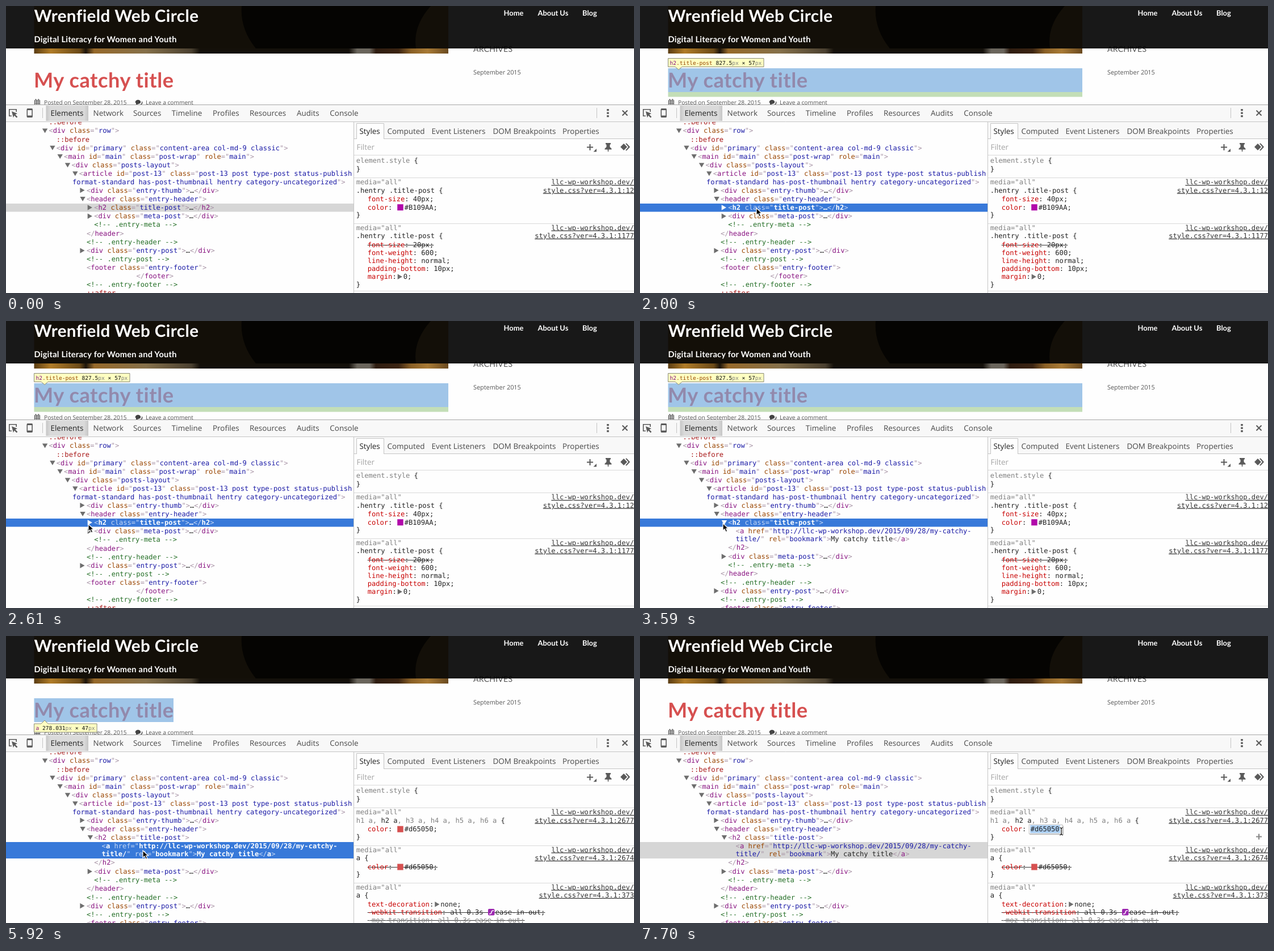
These frames come from a looping animation (1106x507 px, 8000 ms). An HTML page:

```html
<!DOCTYPE html>
<html lang="en">
<head>
<meta charset="utf-8">
<title>Inspecting a title</title>
<style>
html, body { margin: 0; width: 100%; height: 100%; overflow: hidden; background: #fefefe; }
svg { display: block; width: 100%; height: 100%; }
text { white-space: pre; text-rendering: geometricPrecision; }
.site { font-family: Lato, sans-serif; font-weight: 700; fill: #fff; }
.body { font-family: "Open Sans", sans-serif; fill: #555; }
.ui { font: 13.45px "Open Sans", sans-serif; fill: #484848; }
.code { font: 12.1px "DejaVu Sans Mono", monospace; fill: #222; }
.tip { font: 9.61px "DejaVu Sans Mono", monospace; fill: #111; }
.p { fill: #a894a6; }
.t { fill: #881280; }
.n { fill: #994500; }
.v { fill: #1a1aa6; }
.c { fill: #236e25; }
.s { fill: #a81818; }
.k { fill: #c80000; }
.dim, .dim .k { fill: #808080; }
.link { text-anchor: end; text-decoration: underline; fill: #333; }
.tri { fill: #6e6e6e; }
.sel .code, .sel .t, .sel .v { fill: #fff; font-weight: 700; }
.sel .p, .sel .n { fill: #c6d8f5; font-weight: 400; }
.sel .tri { fill: #fff; }
.blue { fill: #3879d9; }
.gray { fill: #d6d6d6; }
.hover { fill: #eaf2fb; }
.content { fill: rgba(111, 168, 220, .66); }
.padding { fill: rgba(147, 196, 125, .55); }
.bar { fill: #f8f8f8; }
.rule { stroke: #d9d9d9; }
.edge { stroke: #c4c4c4; }
.icon { fill: #5a5a5a; }
.line { fill: none; stroke: #5a5a5a; stroke-width: 1.6; }
</style>
</head>
<body>
<svg viewBox="0 0 1106 507">
  <defs>
    <linearGradient id="tab">
      <stop offset="0" stop-color="#c6c6c6"/><stop offset=".1" stop-color="#dadada"/>
      <stop offset=".9" stop-color="#dadada"/><stop offset="1" stop-color="#c6c6c6"/>
    </linearGradient>
    <linearGradient id="photo">
      <stop offset="0" stop-color="#5a3c12"/><stop offset=".04" stop-color="#b07c28"/>
      <stop offset=".11" stop-color="#6b4a18"/><stop offset=".125" stop-color="#1c140a"/>
      <stop offset=".145" stop-color="#96692a"/><stop offset=".27" stop-color="#85704a"/>
      <stop offset=".38" stop-color="#4a4030"/><stop offset=".4" stop-color="#14100a"/>
      <stop offset=".76" stop-color="#14100a"/><stop offset=".78" stop-color="#6a655c"/>
      <stop offset=".81" stop-color="#6a655c"/><stop offset=".825" stop-color="#2e1c10"/>
      <stop offset=".88" stop-color="#3b2412"/><stop offset=".91" stop-color="#8a6026"/>
      <stop offset=".95" stop-color="#a87a35"/><stop offset="1" stop-color="#6a4a20"/>
    </linearGradient>
  </defs>

  <!-- web page -->
  <rect width="1106" height="507" fill="#fefefe"/>
  <path fill="url(#photo)" d="M49.500 75H779V84H49.500z"/>
  <text class="site" x="823" y="81.3" font-size="14" letter-spacing=".25" style="font-weight:400;fill:#555">ARCHIVES</text>
  <path fill="#000" fill-opacity=".905" d="M0 0H1106V75H0z"/>
  <path fill="#130f08" d="M49.500 0H779V75H49.500z"/>
  <path fill="#050402" d="M415 0H748Q716 36 722 75H440Q412 40 415 0z"/>
  <g class="site">
    <text x="49.5" y="28" font-size="29.6" letter-spacing=".4">Wrenfield Web Circle</text>
    <text x="49.5" y="64.3" font-size="14.6" letter-spacing=".23">Digital Literacy for Women and Youth</text>
    <g font-size="12.9">
      <text x="876.5" y="17">Home</text><text x="936.5" y="17">About Us</text><text x="1015" y="17">Blog</text>
    </g>
    <text x="49" y="143.5" font-size="36.2" letter-spacing=".55" style="fill:#d65050">My catchy title</text>
  </g>
  <g class="body">
    <text x="823" y="121" font-size="10.9">September 2015</text>
    <text x="67" y="174.3" font-size="10.2">Posted on September 28, 2015</text>
    <text x="246" y="174.3" font-size="10.2">Leave a comment</text>
  </g>
  <path fill="none" stroke="#444" d="M50.5 166.5h9v9h-9zM50.5 169.5h9M53.5 167v8M56.5 167v8M50 172.500h10M52.500 164v3M57.500 164v3"/>
  <g fill="#444"><ellipse cx="232.500" cy="169.500" rx="4.800" ry="3.700"/><path d="M229 171v4l4-2zM236 174q4-1 3-6q3 3 0 6v2z"/></g>
  <g id="overlays"></g>

  <!-- element tree -->
  <path fill="#fefefe" d="M0 204H612V507H0z"/>
  <g id="tree"></g>

  <!-- styles pane -->
  <path fill="#fefefe" d="M612 204H1106V507H612z"/>
  <path class="bar" d="M613 205H1106V234H613z"/>
  <path class="edge" fill="none" d="M612.500 204V507M613 234.500H1106"/>
  <path class="edge" fill="#fefefe" d="M617.500 235V207.500H665.500V235"/>
  <path class="rule" d="M613 263.500H1106M613 303.500H1106"/>
  <g class="ui">
    <text x="622.500" y="225.800" style="fill:#222">Styles</text>
    <text x="671.500" y="225.800">Computed</text>
    <text x="749.500" y="225.800">Event Listeners</text>
    <text x="857.500" y="225.800">DOM Breakpoints</text>
    <text x="980" y="225.800">Properties</text>
    <text x="617.500" y="254" style="fill:#a4a4a4">Filter</text>
  </g>
  <path class="line" style="stroke-width:2" d="M1023 249.500h11M1028.500 244v11"/>
  <path class="icon" d="M1040 252v5.500h-5.500zM1056 242h9v2l-1.500 1v4l3 3v1.500h-5l-.5 4h-1l-.5-4h-5v-1.500l3-3v-4l-1.500-1z"/>
  <path class="icon" d="M1082 249l6-6 6 6-6 6z"/>
  <path class="icon" d="M1091 243l2-.5 6 6.500-6 6.500-2-.5 5-6z"/>
  <g id="styles"></g>

  <!-- toolbar -->
  <path class="bar" d="M0 174H1106V204H0z"/>
  <path class="edge" d="M0 204.500H1106M64.500 180V198M1040.500 180V198"/>
  <path stroke="#a6a6a6" d="M0 174.500H1106"/>
  <path fill="url(#tab)" d="M70.500 176H145V203H70.500z"/>
  <g id="tabs" class="ui"></g>
  <path class="line" d="M10 194.200H5.800V182.800H18.200V187"/>
  <path class="icon" d="M10 186l10 4-3.600 1.800 4 4-1.800 1.800-4-4-1.700 3.600z"/>
  <rect class="line" x="37.300" y="181.800" width="8.800" height="14.500" rx="1.200"/>
  <path class="icon" d="M37 181.500h9.500v2.500H37zM37 193.500h9.500v3H37zM1058.200 182h3.600v3.300h-3.600zM1058.200 187.500h3.600v3.300h-3.600zM1058.200 193h3.600v3.300h-3.600z"/>
  <path class="line" style="stroke-width:2" d="M1085.500 184.500l9 9M1094.500 184.500l-9 9"/>

  <g id="pointer"><g id="arrow">
    <path fill="#000" stroke="#fff" stroke-width="1.200" d="M0 0V12.600L3 9.900L5.200 15L7.800 13.900L5.600 9H9.600z"/>
  </g></g>
  <g id="beam">
    <path fill="none" stroke="#fff" stroke-width="2.600" d="M739 338.500q3 0 3 2.500v8q0 2.500-3 2.500M745 338.500q-3 0-3 2.500v8q0 2.500 3 2.500"/>
    <path fill="none" stroke="#111" stroke-width="1.200" d="M739 338.500q3 0 3 2.500v8q0 2.500-3 2.500M745 338.500q-3 0-3 2.500v8q0 2.500 3 2.500"/>
  </g>
</svg>

<script>
const CHAR = 7.285, TIP_CHAR = 5.785, LOOP = 8000;
const $ = id => document.getElementById(id);
const group = (id, ...parts) => `<g id="${id}">${parts.join('')}</g>`;
const box = (cls, x, y, w, h, r = 0) =>
  `<rect class="${cls}" x="${x}" y="${y}" width="${w}" height="${h}" rx="${r}"/>`;
const span = (cls, s) => s ? `<tspan class="${cls}">${s.replace(/</g, '&lt;')}</tspan>` : '';
const code = (x, mid, body, cls = '') =>
  `<text class="code ${cls}" x="${x}" y="${mid + 3.9}">${body}</text>`;
const tri = (x, mid, open) =>
  `<path class="tri" d="M${x} ${open ? mid - 4 + 'h9.4l-4.7 8z' : mid - 4.7 + 'l8.2 4.7l-8.2 4.7z'}"/>`;

// Syntax colours for one line of markup; a line may begin inside a value.
const TOKEN = /^([^<"=]+)(")|(<!--.*?-->)|(::\w+)|(<\/?)(\w+)|([\w-]+)(=")([^"]*)("?)|([>"])/g;
const paint = src => src.replace(TOKEN, (m, rest, quote, note, pseudo, open, tag, attr, eq, val, end, mark) =>
  span('v', rest || '') + span('p', quote) + span('c', note) + span('s', pseudo) + span('p', open) +
  span('t', tag) + span('n', attr) + span('p', eq) + span('v', val) + span('p', end) + span('p', mark));

// Arrow: 'v' for an open node, '>' for a closed one.
const row = (level, mid, src, arrow) => {
  const x = 75.5 + 13.3 * level;
  return (arrow ? tri(x - 11.6, mid, arrow === 'v') : '') + code(x, mid, paint(src));
};

const h2Tag = '<h2 class="title-post">';
const h2Shut = row(6, 356, h2Tag + '…</h2>', '>');
const h2Open = row(6, 356, h2Tag, 'v');
const anchor = row(7, 371, '<a href="http://llc-wp-workshop.dev/2015/09/28/my-catchy-') +
  row(7, 385.3, 'title/" rel="bookmark">My catchy title</a>');
const selected = s => `<g class="sel">${s}</g>`;
const tail = top => [
  [6, '<div class="meta-post">…</div>', '>'],
  [6, '<!-- .entry-meta -->'],
  [5, '</header>'],
  [5, '<!-- .entry-header -->'],
  [5, '<div class="entry-post">…</div>', '>'],
  [5, '<!-- .entry-post -->'],
  [5, '<footer class="entry-footer">']
].map(([level, src, arrow], i) => row(level, top + i * 15.2, src, arrow)).join('');

$('tree').innerHTML = [
  group('hoverArticle', box('hover', 2, 289, 606, 30, 5)),
  group('hoverHeader', box('hover', 2, 394, 606, 15, 5)),
  group('hoverNote', box('hover', 2, 379, 606, 15, 5)),
  group('hoverAnchor', box('hover', 2, 364, 606, 29, 5)),
  row(0, 205.3, '::before'),
  row(0, 220.5, '<div class="row">', 'v'),
  row(1, 236, '::before'),
  row(1, 250.7, '<div id="primary" class="content-area col-md-9 classic">', 'v'),
  row(2, 266, '<main id="main" class="post-wrap" role="main">', 'v'),
  row(3, 281.2, '<div class="posts-layout">', 'v'),
  row(4, 296.3, '<article id="post-13" class="post-13 post type-post status-publish', 'v'),
  code(117, 310.6, paint('format-standard has-post-thumbnail hentry category-uncategorized">')),
  row(5, 325.6, '<div class="entry-thumb">…</div>', '>'),
  row(5, 341, '<header class="entry-header">', 'v'),
  group('h2Idle', box('gray', 0, 349, 612, 14.5), h2Shut),
  group('h2Picked', box('blue', 0, 349, 612, 14.5), selected(h2Shut)),
  group('h2Opened', box('blue', 0, 349, 612, 14.5), selected(h2Open)),
  group('h2Left', h2Open),
  group('shut', tail(371.3), code(229.5, 477.5, paint('</footer>')),
    row(5, 492.5, '<!-- .entry-footer -->'), row(5, 507.5, '::after')),
  group('open', row(6, 400.5, '</h2>'), tail(416)),
  group('anchorIdle', anchor),
  group('anchorPicked', box('blue', 0, 364, 612, 29), selected(anchor)),
  group('anchorBlur', box('gray', 0, 364, 612, 29), anchor)
].join('');

// Page highlight and its size label
const tip = (y, tag, cls, w, h, below) => {
  const chars = `${tag}${cls} ${w}px × ${h}px`.length;
  const width = chars * TIP_CHAR + 6.5, right = 49.5 + width;
  const d = below
    ? `M49.5 ${y}H62l6-6 6 6H${right}v15H49.5z`
    : `M49.5 ${y}H${right}v15H74l-6 5-6-5H49.5z`;
  return `<path fill="#ffffc2" stroke="#8a8a78" d="${d}"/><text class="tip" x="52.5" y="${y + 11}">` +
    span('t', tag) + span('n', cls) + ` ${w}` + span('dim', 'px') + ` × ${h}` + span('dim', 'px') + '</text>';
};
$('overlays').innerHTML = [
  group('markArticle', box('content', 49.5, 0, 729.5, 175), box('padding', 31.5, 0, 18, 175), box('padding', 779, 0, 18, 175)),
  group('markHeader', box('content', 49.5, 110, 729.5, 65), tip(92.5, 'header', '.entry-header', 827.5, 89)),
  group('markTitle', box('content', 49.5, 110, 729.5, 42), box('padding', 49.5, 152, 729.5, 8.5),
    tip(92.5, 'h2', '.title-post', 827.5, 57)),
  group('markAnchor', box('content', 49.5, 110, 245.5, 42), tip(155, 'a', '', 278.031, 47, true))
].join('');

// Style rules
const head = (mid, selector, line) =>
  code(616.7, mid, 'media="all"', 'dim') + code(616.7, mid + 14.4, selector + ' {') +
  code(1106, mid, 'llc-wp-workshop.dev/', 'link') + code(1106, mid + 14.4, 'style.css?ver=4.3.1:' + line, 'link');
const brace = mid => code(616.7, mid, '}');
const rule = y => `<path class="rule" d="M613 ${y}.5H1106"/>`;
const icons = {
  arrow: (x, y) => tri(x + 2, y, false),
  curve: (x, y) => `<rect x="${x + 1}" y="${y - 6}" width="11.500" height="11.500" rx="2" fill="#9c27b0"/>` +
    `<path d="M${x + 3} ${y + 3}q4 0 4-3t4-3" fill="none" stroke="#fff" stroke-width="1.500"/>`,
  field: (x, y) => `<rect x="${x - 1.5}" y="${y - 6}" width="60" height="16" fill="#888" opacity=".5"/>` +
    `<rect x="${x - 2.5}" y="${y - 8}" width="58.500" height="16" fill="#fff" stroke="#c4c4c4"/>` +
    `<rect x="${x - .5}" y="${y - 7}" width="53" height="14" fill="#acd0f5"/>`
};
const swatch = color => (x, y) => `<rect x="${x + 1.5}" y="${y - 5.5}" width="10.500" height="11" fill="${color}"/>`;

// '@' in a value is the place of its icon.
const prop = (mid, name, value, { icon, gap = 14, struck, cls } = {}) => {
  const x = 636.7, [pre, post = ''] = value.split('@');
  const at = x + (name.length + 1 + pre.length) * CHAR;
  const end = x + (name.length + 1 + pre.length + post.length) * CHAR + (icon ? gap : 0);
  return (struck ? `<path d="M${x} ${mid + .5}H${end}" stroke="#333"/>` : '') + (icon ? icon(at, mid) : '') +
    code(x, mid, span('k', name) + ':' + pre + (post && `<tspan dx="${icon ? gap : 0}">${post}</tspan>`), cls);
};
const arrow = { icon: icons.arrow, gap: 12 };
const red = swatch('#d65050');
const check = mid => `<rect x="618.500" y="${mid - 5}" width="10" height="10" rx="2" fill="#fff" stroke="#aaa"/>` +
  `<path d="M620.500 ${mid}l2.500 3 4-6" fill="none" stroke="#444" stroke-width="1.500"/>`;
const plus = mid => `<path d="M1085 ${mid}h10M1090 ${mid - 5}v10" stroke="#888" stroke-width="2.200"/>`;

$('styles').innerHTML = [
  code(616.7, 273.5, span('dim', 'element.style') + ' {'), brace(288.5),
  group('titleRules',
    head(311.3, '.hentry .title-post', 12),
    prop(341.2, 'font-size', ' 40px;'),
    prop(355.7, 'color', ' @#B109AA;', { icon: swatch('#b109aa') }),
    brace(369.5), rule(384),
    head(391.6, '.hentry .title-post', 1177),
    prop(422, 'font-size', ' 20px;', { struck: true }),
    prop(436, 'font-weight', ' 600;'),
    prop(450, 'line-height', ' normal;'),
    prop(464, 'padding-bottom', ' 10px;'),
    prop(478.3, 'margin', '@0;', arrow),
    brace(492), rule(503)),
  group('linkRules',
    head(311.3, span('dim', 'h1 a, ') + 'h2 a' + span('dim', ', h3 a, h4 a, h5 a, h6 a'), 2677),
    brace(355.3), rule(370),
    head(377.6, 'a', 2674),
    prop(408, 'color', ' @#d65050;', { icon: red, struck: true }),
    brace(421.5), rule(436),
    head(443.6, 'a', 373),
    prop(474, 'text-decoration', '@none;', arrow),
    prop(488, '-webkit-transition', ' all 0.3s @ease-in-out;', { icon: icons.curve, struck: true }),
    prop(502, '-moz-transition', ' all 0.3s @ease-in-out;', { struck: true, cls: 'dim' })),
  group('colorShown', prop(341.2, 'color', ' @#d65050;', { icon: red })),
  group('colorEdit', prop(341.2, 'color', ' @#d65050;', { icon: icons.field, gap: 0 })),
  group('checkFirst', check(341)),
  group('plusFirst', plus(354.5)),
  group('hoverSecond', check(408), plus(420.5))
].join('');

$('tabs').innerHTML = Object.entries({
  Elements: 78.5, Network: 153.5, Sources: 224, Timeline: 291.8, Profiles: 364, Resources: 429, Audits: 512, Console: 570.3
}).map(([name, x], i) => `<text x="${x}" y="194" ${i ? '' : 'style="fill:#222"'}>${name}</text>`).join('');

// Timeline: every change is a hard step.
let css = '';
const animate = (id, steps) => {
  const keys = steps.map(([t, v]) => `${t / LOOP * 100}%{${v}}`).join('');
  css += `@keyframes ${id}{${keys}}#${id}{animation:${id} ${LOOP}ms step-end infinite}`;
};
const show = (id, ...times) => animate(id, [
  ...(times[0] ? [[0, 'opacity:0']] : []),
  ...times.map((t, i) => [t, `opacity:${i % 2 ? 0 : 1}`])
]);

show('h2Idle', 0, 270);
show('h2Picked', 270, 3590);
show('h2Opened', 3590, 4660);
show('h2Left', 4660);
show('shut', 0, 3590);
show('open', 3590);
show('anchorIdle', 3590, 4660);
show('anchorPicked', 4660, 7610);
show('anchorBlur', 7610);
show('hoverArticle', 1910, 2000);
show('hoverHeader', 2080, 2350);
show('hoverNote', 2350, 2520);
show('hoverAnchor', 4130, 4660);
show('markArticle', 1910, 2000);
show('markHeader', 2080, 2350);
show('markTitle', 2000, 2080, 2520, 4130);
show('markAnchor', 4130, 6190);
show('titleRules', 0, 4750);
show('linkRules', 4750);
show('colorShown', 4750, 7700);
show('colorEdit', 7700);
show('hoverSecond', 6190, 6810);
show('checkFirst', 6810, 7700);
show('plusFirst', 6810);
show('pointer', 1730, 7700);
show('beam', 7700);
animate('arrow', [
  [0, 441, 122], [1820, 390, 190], [1910, 285, 300], [2000, 205, 357], [2080, 163, 404], [2170, 148, 398],
  [2350, 145, 389], [2430, 143, 379], [2520, 144, 363], [2610, 145, 359], [3140, 146, 357.5],
  [4040, 154, 361], [4130, 168, 368], [4210, 177, 372], [4300, 180.5, 373.5],
  [5920, 241, 379], [6010, 400, 385], [6100, 560, 390], [6190, 690, 402], [6270, 745, 409], [6360, 757, 410],
  [6630, 757, 404], [6720, 754, 385], [6810, 750, 362], [6900, 747, 348], [6980, 746, 343]
].map(([t, x, y]) => [t, `transform:translate(${x}px,${y}px)`]));
document.head.appendChild(document.createElement('style')).textContent = css;
</script>
</body>
</html>
```
